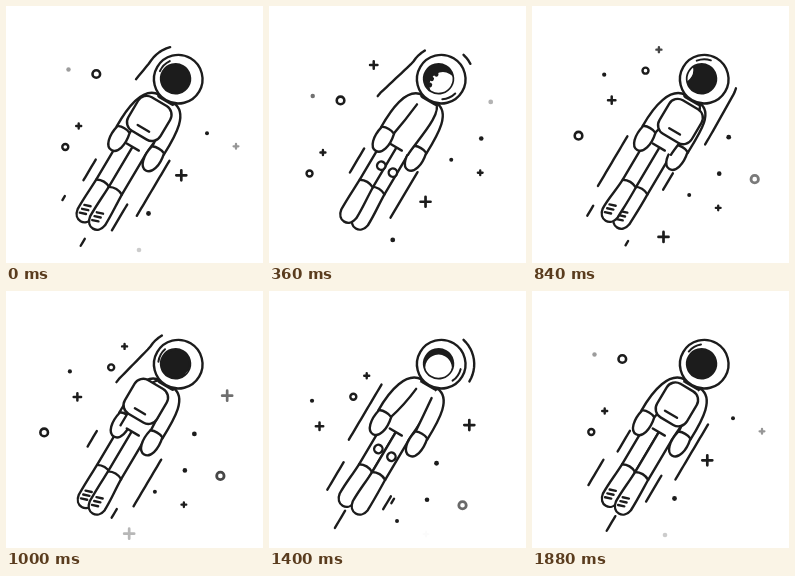
An HTML page with a canvas for the animation above (1.92 s loop, 257x257 px).

```html
<!DOCTYPE html>
<html lang="en">
<head>
<meta charset="utf-8">
<title>Floating astronaut</title>
<style>
html, body { margin: 0; width: 100%; height: 100%; overflow: hidden; background: #fff; }
canvas { display: block; width: 100vw; height: 100vh; }
</style>
</head>
<body>
<canvas id="stage"></canvas>
<script>
const SIZE = 257, LOOP = 1920, STEP = 40, TAU = Math.PI * 2;
const INK = '#1c1c1c';
const canvas = document.getElementById('stage');
const ctx = canvas.getContext('2d');
const ratio = Math.max(1, window.devicePixelRatio || 1);
canvas.width = canvas.height = Math.round(SIZE * ratio);

const clamp = (v, lo, hi) => Math.min(hi, Math.max(lo, v));

// kind, x, y, radius, line width
const STARS = [
  ['ring', 90.3, 68, 3.8, 2.6], ['dot', 62.5, 63.5, 2.2], ['plus', 175.3, 169.3, 5, 2.7],
  ['dot', 201, 127.3, 2], ['plus', 230, 140.3, 2.4, 2.3], ['dot', 231, 106, 2.3],
  ['plus', 123.5, 32.5, 3.7, 2.5], ['dot', 240.5, 69.5, 2.4], ['ring', 157.3, 3, 3, 2.4],
  ['dot', 116, 7, 2.1], ['ring', 266.5, 111.5, 3.7, 2.8], ['plus', 170.7, -18, 2.5, 2.4]
];
const DRIFT = [-98, 138];

function drawStar(kind, x, y, r, w) {
  const alpha = clamp((107 - Math.hypot(x - 129, y - 140)) / 13, 0, 1);
  if (!alpha) return;
  ctx.globalAlpha = alpha;
  ctx.lineWidth = w || 1;
  ctx.beginPath();
  if (kind === 'plus') {
    ctx.moveTo(x - r, y); ctx.lineTo(x + r, y);
    ctx.moveTo(x, y - r); ctx.lineTo(x, y + r);
  } else {
    ctx.arc(x, y, r, 0, TAU);
  }
  if (kind === 'dot') { ctx.fillStyle = INK; ctx.fill(); } else ctx.stroke();
  ctx.globalAlpha = 1;
}

function drawStars(t) {
  const u = Math.min(1, t / (LOOP - STEP));
  for (const [kind, x, y, r, w] of STARS)
    for (let k = -1; k <= 1; k++)
      drawStar(kind, x + DRIFT[0] * (u + k), y + DRIFT[1] * (u + k), r, w);
}

// side offset, time at the middle, length, speed, start, end
const long = (n, t0, hi, lo = -125) => [n, t0, 64, 0.62, lo, hi];
const STREAKS = [
  long(31, 289, 65), long(38, 595, 65), long(38, 931, 65),
  long(32, 1252, 65), long(38, 1580, 65), long(38, 1877, 65),
  long(-36, 146, 70, -106), long(-42, 465, 68), long(-33, 775, 66),
  long(-40, 1105, 66), long(-37, 1400, 70), long(-34, 1742, 83),
  [-27, 278, 28, 0.4, 4, 100], [-27, 575, 20, 0.36, 4, 97], [-32, 930, 18, 0.4, 4, 110],
  [-30, 1225, 32, 0.4, 4, 100], [-27, 1520, 26, 0.4, 4, 100], [-26, 1812, 24, 0.4, 4, 100],
  [25, 520, 30, 0.4, 17, 86], [25, 780, 24, 0.4, 17, 86],
  [28, 1233, 15, 0.4, 17, 86], [24, 1748, 30, 0.4, 17, 86],
  [5, 180, 20, 0.25, 96, 113], [5, 1460, 20, 0.25, 96, 113], [-4, 980, 20, 0.25, 95, 115],
  [-15, 740, 18, 0.25, 95, 114], [-18, 124, 18, 0.25, 95, 116], [21, 408, 20, 0.25, 95, 103]
];

// Runs around the helmet first, then straight along the body
function flowPoint(n, s) {
  const side = Math.sign(n);
  if (s < -80) {
    const a = (-80 - s) / 33;
    return [4 + side * 33 * Math.cos(a), -80 - 33 * Math.sin(a)];
  }
  const mix = clamp((s + 80) / 45, 0, 1);
  const edge = 4 + side * 33;
  return [s < -20 ? edge + (n - edge) * mix : n, s];
}

function drawStreaks(t) {
  ctx.lineWidth = 2.4;
  for (const [n, t0, len, speed, lo, hi] of STREAKS) {
    for (const shift of [0, LOOP]) {
      const mid = (t - t0 + shift) * speed;
      const a = Math.max(lo, mid - len / 2), b = Math.min(hi, mid + len / 2);
      if (b - a < 1) continue;
      ctx.beginPath();
      const count = Math.ceil((b - a) / 4);
      for (let i = 0; i <= count; i++) ctx.lineTo(...flowPoint(n, a + (b - a) * i / count));
      ctx.stroke();
    }
  }
}

function paint(build, fill = '#fff') {
  ctx.beginPath();
  build();
  ctx.fillStyle = fill;
  ctx.fill();
  ctx.stroke();
}

function line(x1, y1, x2, y2) {
  ctx.beginPath();
  ctx.moveTo(x1, y1);
  ctx.lineTo(x2, y2);
  ctx.stroke();
}

const HIP = -4.5;

function drawLeg(side, c, s) {
  const x = HIP + side * 7.6 * c, foot = x - 0.5 + 2 * s;
  paint(() => {
    ctx.moveTo(x - 7.6, -2);
    ctx.lineTo(x - 7.6, 48);
    ctx.bezierCurveTo(x - 8, 62, foot - 9, 70, foot - 8.7, 83);
    ctx.bezierCurveTo(foot - 7, 95, foot + 7, 95, foot + 8.7, 83);
    ctx.bezierCurveTo(foot + 9, 70, x + 8, 62, x + 7.6, 48);
    ctx.lineTo(x + 7.6, -2);
  });
  ctx.beginPath();
  ctx.moveTo(x - 7.6, 48);
  ctx.quadraticCurveTo(x, 44, x + 7.6, 48);
  ctx.stroke();
  if (c < -0.05) {
    paint(() => ctx.arc(x + 1.5 + 5 * s, 25, 4.2, 0, TAU));
  } else if (c > 0.5) {
    for (let i = 0; i < 3; i++) {
      const y = 75 + i * 4.5;
      line(foot - 5, y + 1, foot + 1, y - 1);
    }
  }
}

function drawTorso(c, s) {
  const top = 13 * Math.abs(c) + 11 * Math.abs(s);
  const hip = 7.6 * Math.abs(c) + 7.6;
  paint(() => {
    ctx.moveTo(HIP - hip, 2);
    ctx.bezierCurveTo(HIP - hip, -12, -top - 3, -52, -7, -57);
    ctx.lineTo(7, -57);
    ctx.bezierCurveTo(top + 3, -52, HIP + hip, -12, HIP + hip, 2);
  });
  if (Math.abs(c) > 0.5) line(HIP - 7, 1.5, HIP + 7, 1.5);
}

function drawArm(side, c, s) {
  const out = (side * c >= 0 ? 1 : -1);
  const hand = -2 + side * 21 * c + 2 * s;
  const root = side * 9 * c;
  const outer = () => {
    ctx.moveTo(root, -57);
    ctx.bezierCurveTo(root + 17 * out, -56, hand + 8 * out, -32, hand + 7.5 * out, -8);
  };
  ctx.beginPath();
  outer();
  ctx.lineTo(hand - 6.5 * out, -8);
  ctx.lineTo(root, -46);
  ctx.fillStyle = '#fff';
  ctx.fill();
  ctx.beginPath();
  outer();
  ctx.moveTo(hand - 6.5 * out, -8);
  ctx.quadraticCurveTo(root + 2 * out, -26, root, -46);
  ctx.stroke();
  paint(() => {
    ctx.moveTo(hand - 7, -9);
    ctx.bezierCurveTo(hand - 10, 4, hand - 7, 15, hand, 15);
    ctx.bezierCurveTo(hand + 7, 15, hand + 10, 4, hand + 7, -9);
    ctx.quadraticCurveTo(hand, -12, hand - 7, -9);
  });
}

function drawPack(c, s) {
  const x = -3 - 20 * s * Math.abs(s);
  const half = (c > 0 ? 17 : 14) * Math.abs(c) + 8 * Math.abs(s);
  paint(() => ctx.roundRect(x - half, -51, half * 2, 39, 10));
  if (c > 0.3) line(x - 7 * c, -20, x + 7 * c, -20);
}

function drawHead(p, c) {
  paint(() => ctx.roundRect(-9, -60, 18, 5, 2));
  paint(() => ctx.arc(0, -80, 24.3, 0, TAU));

  const fx = 60 * (0.5 - p) + 2.5, hx = -2.5, hy = -79;
  ctx.save();
  paint(() => ctx.arc(hx, hy, 14.5, 0, TAU), INK);
  ctx.beginPath();
  ctx.arc(hx, hy, 14, 0, TAU);
  ctx.clip();
  ctx.beginPath();
  ctx.arc(hx + fx, hy + 3.5, 13.3, 0, TAU);
  ctx.fillStyle = '#fff';
  ctx.fill();
  if (Math.abs(fx) > 3 && Math.abs(fx) < 20) {
    const base = fx > 0 ? Math.PI : 0;
    ctx.fillStyle = INK;
    for (let i = -1; i <= 1; i++) {
      const a = base + i * 0.5;
      ctx.beginPath();
      ctx.arc(hx + fx + 13 * Math.cos(a), hy + 3.5 + 13 * Math.sin(a), 2.4, 0, TAU);
      ctx.fill();
    }
  }
  ctx.restore();

  // Reflection circling the glass
  const glint = TAU * (-0.41 - p) - 0.22 * (1 - c);
  ctx.lineWidth = 2;
  ctx.beginPath();
  ctx.arc(0, -80, 20, glint - 0.36, glint + 0.36);
  ctx.stroke();
}

function drawAstronaut(t) {
  const p = (t / 960 + 0.05) % 1;
  const c = Math.cos(p * TAU), s = Math.sin(p * TAU);
  ctx.save();
  ctx.translate(4, 0);
  ctx.lineWidth = 2.4;
  const parts = [[0, () => drawTorso(c, s)], [2 * c, () => drawPack(c, s)]];
  for (const side of [-1, 1]) {
    parts.push([side * s * 0.1 - 0.4, () => drawLeg(side, c, s)]);
    parts.push([side * s + 0.45, () => drawArm(side, c, s)]);
  }
  parts.sort((a, b) => a[0] - b[0]);
  for (const [, draw] of parts) draw();
  drawHead(p, c);
  ctx.restore();
}

function render(now) {
  const t = Math.floor((now % LOOP) / STEP) * STEP;
  const k = canvas.width / SIZE;
  ctx.setTransform(k, 0, 0, k, 0, 0);
  ctx.fillStyle = '#fff';
  ctx.fillRect(0, 0, SIZE, SIZE);
  ctx.strokeStyle = INK;
  ctx.lineCap = ctx.lineJoin = 'round';
  drawStars(t);
  ctx.translate(128, 140);
  ctx.rotate(0.535);
  drawStreaks(t);
  drawAstronaut(t);
}

let start = null;
function tick(now) {
  if (start === null) start = now;
  render(Math.max(0, now - start));
  requestAnimationFrame(tick);
}
render(0);
requestAnimationFrame(tick);
</script>
</body>
</html>
```
